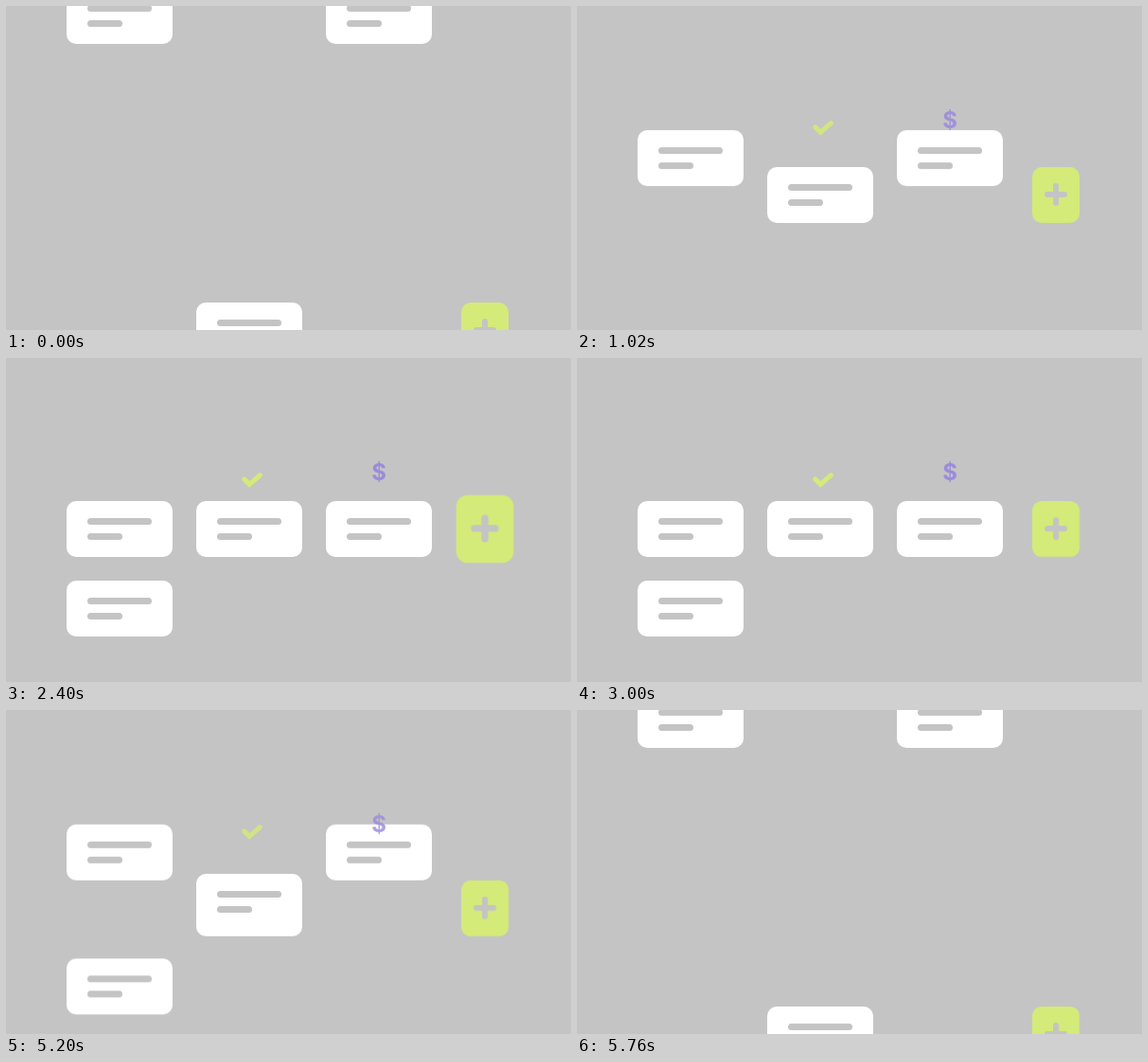
An HTML page that plays this animation: 597 by 342 pixels, repeating every 6.14 s.

```html
<!DOCTYPE html>
<html lang="en">
<head>
<meta charset="utf-8">
<title>Cards</title>
<style>
  html, body { margin: 0; width: 100%; height: 100%; overflow: hidden; background: #c4c4c4; }
  svg { display: block; width: 100%; height: 100%; }

  .anim { animation: 6140ms ease-out infinite; }
  .from-top { animation-name: from-top; }
  .from-bottom { animation-name: from-bottom; }
  .icons { animation-name: icons; }
  .added-first { animation-name: added-first; }
  .added-second { animation-name: added-second; }
  .press { animation-name: press; transform-origin: 506px 180.5px; }

  .lime { fill: #d4ea79; }
  .check { fill: none; stroke: #d4ea79; stroke-width: 5; stroke-linecap: round; }
  .plus { stroke: #c4c4c4; stroke-width: 6; stroke-linecap: round; }
  .dollar { font: 700 24px Inter, sans-serif; fill: #9b8cdb; text-anchor: middle; }

  /* Cards and button gather, hold, then scatter again. */
  @keyframes from-top {
    0%, 9.63%, 93.39%, 100% { transform: translateY(-170px); }
    19.4%, 83.62% { transform: translateY(0); }
  }
  @keyframes from-bottom {
    0%, 9.63%, 93.39%, 100% { transform: translateY(162px); }
    19.4%, 83.62% { transform: translateY(0); }
  }
  @keyframes icons {
    0%, 9.63%, 93.39%, 100% { opacity: 0; }
    19.4%, 83.62% { opacity: 1; }
  }
  /* Each press of the button fades in one more card. */
  @keyframes press {
    0%, 24.19%, 48.45%, 53.83%, 78.83%, 100% { transform: scale(1); }
    33.96%, 38.68%, 63.6%, 69.06% { transform: scale(1.23); }
  }
  @keyframes added-first {
    0%, 24.19% { opacity: 0; transform: translateY(0); }
    33.96%, 83.62% { opacity: 1; transform: translateY(0); }
    93.39%, 100% { opacity: 1; transform: translateY(154px); }
  }
  @keyframes added-second {
    0%, 53.83% { opacity: 0; transform: translateY(0); }
    63.6%, 83.62% { opacity: 1; transform: translateY(0); }
    93.39%, 100% { opacity: 1; transform: translateY(-349px); }
  }
</style>
</head>
<body>
<svg viewBox="0 0 597 342">
  <defs>
    <g id="card">
      <rect width="112" height="59" rx="10" fill="#fff"/>
      <g fill="#c4c4c4">
        <rect x="22" y="18" width="68" height="7" rx="3.5"/>
        <rect x="22" y="34" width="37" height="7" rx="3.5"/>
      </g>
    </g>
  </defs>

  <g class="anim from-top">
    <use href="#card" x="64" y="151"/>
    <use href="#card" x="338" y="151"/>
  </g>
  <g class="anim from-bottom">
    <use href="#card" x="201" y="151"/>
    <g class="anim press">
      <rect class="lime" x="481" y="151" width="50" height="59" rx="10"/>
      <path class="plus" d="M497 180H515M506 171V189"/>
    </g>
  </g>
  <g class="anim added-first"><use href="#card" x="64" y="235"/></g>
  <g class="anim added-second"><use href="#card" x="201" y="235"/></g>

  <g class="anim icons">
    <path class="check" d="M251.7 127.9L257.3 133.4L268.4 123.6"/>
    <text class="dollar" x="394" y="129.2">$</text>
  </g>
</svg>
</body>
</html>
```
